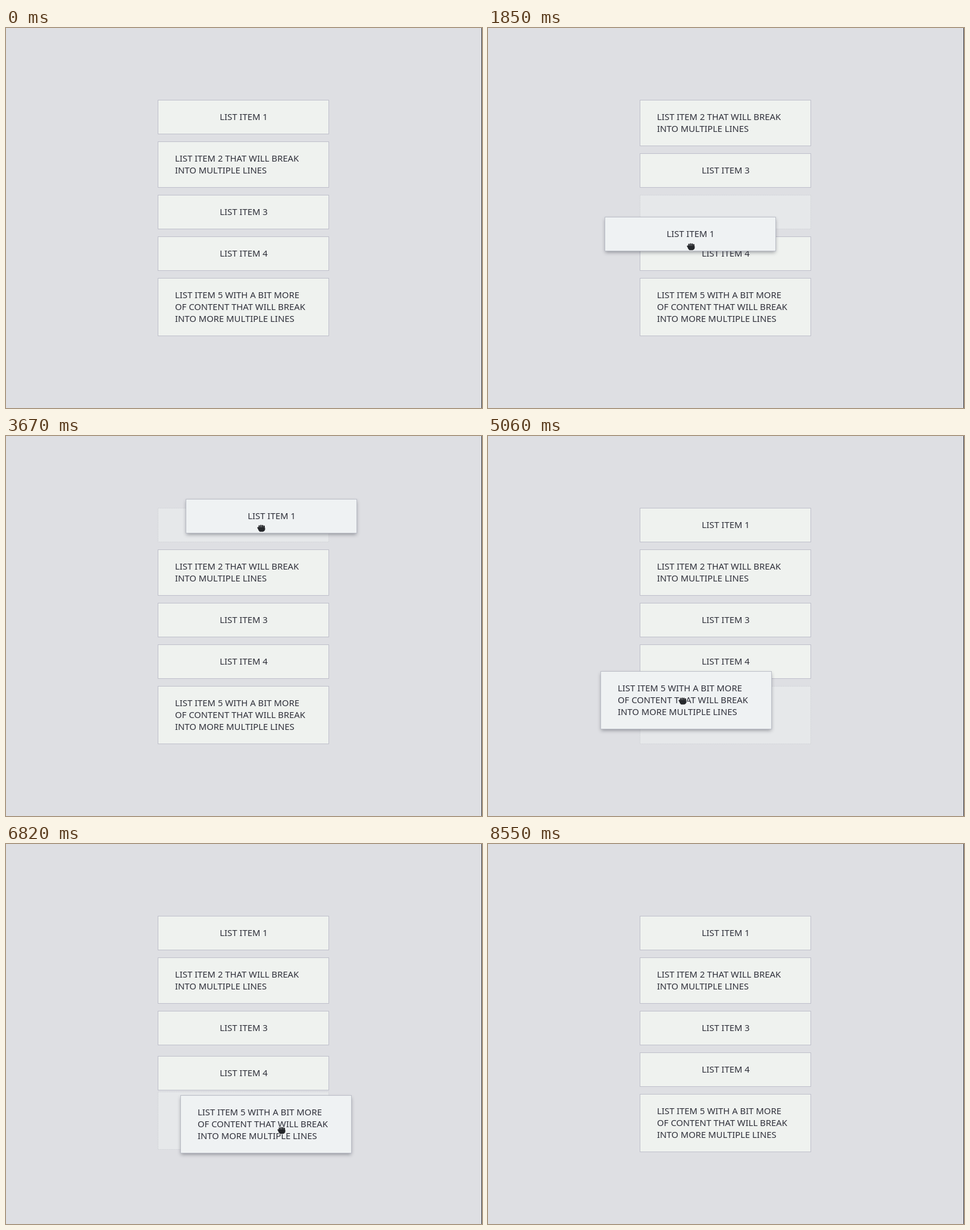
Write an HTML page that moves like this. It is 800 px wide and 640 px high and loops after 9 s.

```html
<!DOCTYPE html>
<html lang="en">
<head>
<meta charset="utf-8">
<title>Sortable list</title>
<style>
  html, body { margin: 0; width: 100%; height: 100%; overflow: hidden; background: #dedfe3; }
  svg { display: block; width: 800px; height: 640px; }
  text { font: 14.85px "Noto Sans", "Open Sans", sans-serif; }
  .shadow { fill: #30333f; filter: blur(3px); }
  .ghost { fill: #e6e8ea; stroke: #d2d4d9; stroke-dasharray: 2 1; }
  .hand { stroke-linecap: round; stroke-linejoin: round; }
</style>
</head>
<body>
<svg viewBox="0 0 800 640">
  <rect width="800" height="640" fill="#dedfe3"/>
  <rect x="799" width="1" height="640" fill="#33343c"/>
  <rect id="ghost" class="ghost" x="255.5" width="287"/>
  <g id="list"></g>
  <g id="cursor" class="hand"></g>
</svg>
<script>
const LOOP = 9000, LEFT = 255, TOP = 121, WIDTH = 288, GAP = 12;
const MOVE = 200; // ms for a slot change or a drop
const LAG = 90;   // ms the dragged item trails the pointer

const items = [
  ["LIST ITEM 1"],
  ["LIST ITEM 2 THAT WILL BREAK", "INTO MULTIPLE LINES"],
  ["LIST ITEM 3"],
  ["LIST ITEM 4"],
  ["LIST ITEM 5 WITH A BIT MORE", "OF CONTENT THAT WILL BREAK", "INTO MORE MULTIPLE LINES"]
].map(lines => ({ lines, h: 38 + 20 * lines.length, moves: [] }));

// reach: pointer arrives; path: time, x, y after leaving the slot
const drags = [
  { id: 0, reach: 790, start: 1090, end: 2000, grip: [144, 48],
    path: [[1390, 231, 143], [1740, 190, 290], [1880, 197, 320]] },
  { id: 0, reach: 2800, start: 2910, end: 3910, grip: [132, 51],
    path: [[3420, 345, 140], [3730, 297, 104]] },
  { id: 4, reach: 4760, start: 4870, end: 5760, grip: [160, 73],
    path: [[5060, 189, 396], [5400, 128, 300], [5740, 140, 270]] },
  { id: 4, reach: 6280, start: 6280, end: 7430, grip: [159, 43],
    path: [[6670, 277, 392], [7050, 313, 452], [7400, 292, 456]] }
];
const enter = { t: 360, at: [434, 33] }, leave = { t: 8180, at: [480, 650] };

const OPEN = "M-3.7-5V2M-.7-7V2M2.3-6.5V2M5.3-4.5V3M-6.5 0L-3 4M-4 1H6V4Q5 7 3 7.5H-1Q-3 6-5 3Z";
const FIST = "M-3.4-3.5V2M-.6-4.3V2M2.2-4V2M4.8-3V2M-5.5-.5L-3 3M-5 0H5.3V2.5Q4.6 4.5 3 5H-2Q-4 3.5-5 0Z";

function set(el, attrs) {
  for (const k in attrs) el.setAttribute(k, attrs[k]);
}
function make(name, attrs, parent) {
  const el = document.createElementNS("http://www.w3.org/2000/svg", name);
  set(el, attrs);
  return parent.appendChild(el);
}
const byId = id => document.getElementById(id);
const list = byId("list"), ghost = byId("ghost"), cursor = byId("cursor");

const clamp = p => Math.max(0, Math.min(1, p));
const mix = (a, b, p) => a.map((v, i) => v + (b[i] - v) * p);
const add = (a, b) => a.map((v, i) => v + b[i]);
const inOut = p => p < .5 ? 4 * p ** 3 : 1 - 4 * (1 - p) ** 3;

// CSS "ease" curve
function ease(p) {
  const bez = (u, a, b) => 3 * u * (1 - u) ** 2 * a + 3 * u * u * (1 - u) * b + u ** 3;
  p = clamp(p);
  if (p === 0 || p === 1) return p;
  let lo = 0, hi = 1;
  for (let i = 0; i < 20; i++) {
    const mid = (lo + hi) / 2;
    if (bez(mid, .25, .25) < p) lo = mid; else hi = mid;
  }
  return bez(lo, .1, 1);
}

// Monotone cubic through the points, one axis at a time
function along(path, t) {
  const last = path.length - 1;
  if (t <= path[0][0]) return path[0].slice(1);
  if (t >= path[last][0]) return path[last].slice(1);
  const i = path.findIndex(p => p[0] > t) - 1;
  const slope = (k, a) => (path[k + 1][a] - path[k][a]) / (path[k + 1][0] - path[k][0]);
  const tangent = (k, a) => {
    if (k === 0 || k === last) return 0;
    const l = slope(k - 1, a), r = slope(k, a);
    return l * r <= 0 ? 0 : 2 * l * r / (l + r);
  };
  const d = path[i + 1][0] - path[i][0], u = (t - path[i][0]) / d, v = 1 - u;
  return [1, 2].map(a =>
    path[i][a] * (1 + 2 * u) * v * v + path[i + 1][a] * u * u * (3 - 2 * u) +
    d * (tangent(i, a) * u * v * v - tangent(i + 1, a) * u * u * v));
}

// Play the drags once: an edge passing a neighbour's middle swaps the two
function planMoves() {
  const order = items.map((_, i) => i);
  const place = t => {
    let y = TOP;
    for (const id of order) {
      const it = items[id];
      if (it.y !== y) it.moves.push([t, y]);
      it.y = y;
      y += it.h + GAP;
    }
  };
  place(-MOVE);
  for (const d of drags) {
    const it = items[d.id];
    d.path.unshift([d.start, LEFT, it.y]);
    for (let t = d.start; t < d.end; t += 10) {
      const y = along(d.path, t)[1], i = order.indexOf(d.id);
      const middle = k => items[order[k]].y + items[order[k]].h / 2;
      let k = i;
      if (i > 0 && y < middle(i - 1)) k = i - 1;
      else if (i < order.length - 1 && y + it.h > middle(i + 1)) k = i + 1;
      if (k === i) continue;
      [order[i], order[k]] = [order[k], order[i]];
      place(t);
    }
  }
}

function slotY(it, t) {
  return it.moves.reduce((y, [at, to]) => y + (to - y) * ease((t - at) / MOVE), it.moves[0][1]);
}

function pointerAt(t) {
  let from = enter.at, since = enter.t;
  for (const d of drags) {
    const grab = add(d.path[0].slice(1), d.grip);
    if (t < d.start - LAG) return mix(from, grab, inOut(clamp((t - since) / (d.reach - since))));
    if (t < d.end) return add(along(d.path, t + LAG), d.grip);
    from = add(along(d.path, d.end), d.grip);
    since = d.end;
  }
  return mix(from, leave.at, inOut(clamp((t - since) / (leave.t - since))));
}

function build() {
  for (const it of items) {
    const single = it.lines.length === 1;
    it.g = make("g", {}, list);
    it.shadow = make("rect", { class: "shadow", x: 1, y: 4, width: WIDTH - 2, height: it.h - 2 }, it.g);
    it.box = make("rect", { x: .5, y: .5, width: WIDTH - 1, height: it.h - 1 }, it.g);
    it.text = make("g", {}, it.g);
    it.lines.forEach((s, i) => {
      const pos = single ? { x: WIDTH / 2 + .5, "text-anchor": "middle" } : { x: 29 };
      make("text", { ...pos, y: 34 + 20 * i }, it.text).textContent = s;
    });
  }
}

function render(t) {
  const drag = drags.find(d => t >= d.start && t < d.end + MOVE);
  items.forEach((it, id) => {
    let pos = [LEFT, slotY(it, t)], lift = 0, settling = false;
    if (drag && drag.id === id) {
      const p = ease((t - drag.end) / MOVE);
      set(ghost, { y: Math.round(pos[1]) + .5, height: it.h - 1 });
      pos = mix(along(drag.path, Math.min(t, drag.end)), pos, p);
      lift = Math.min(1, 2 * (1 - p));
      settling = t >= drag.end;
      if (list.lastChild !== it.g) list.append(it.g);
    }
    if (!settling) pos = pos.map(Math.round);
    const raised = lift > .3;
    set(it.g, { transform: `translate(${pos})` });
    set(it.shadow, { opacity: .45 * lift });
    set(it.box, { fill: raised ? "#eff2f3" : "#eff2ef", stroke: raised ? "#bcbfc8" : "#bfc0cb" });
    set(it.text, { fill: settling ? "#48494f" : "#2f303a" });
  });
  ghost.style.display = drag ? "" : "none";

  const closed = drags.some(d => t >= d.start - 40 && t < d.end);
  cursor.style.display = t >= enter.t && t < leave.t ? "" : "none";
  set(cursor, { transform: `translate(${pointerAt(t).map(Math.round)})` });
  for (const part of hand) set(part, { d: closed ? FIST : OPEN });
}

planMoves();
build();
const hand = [["#f4f5f6", 4.4], ["#26282c", 2.3]].map(([c, w]) =>
  make("path", { fill: c, stroke: c, "stroke-width": w }, cursor));

const begin = performance.now();
function frame() {
  render((performance.now() - begin) % LOOP);
  requestAnimationFrame(frame);
}
frame();
</script>
</body>
</html>
```
